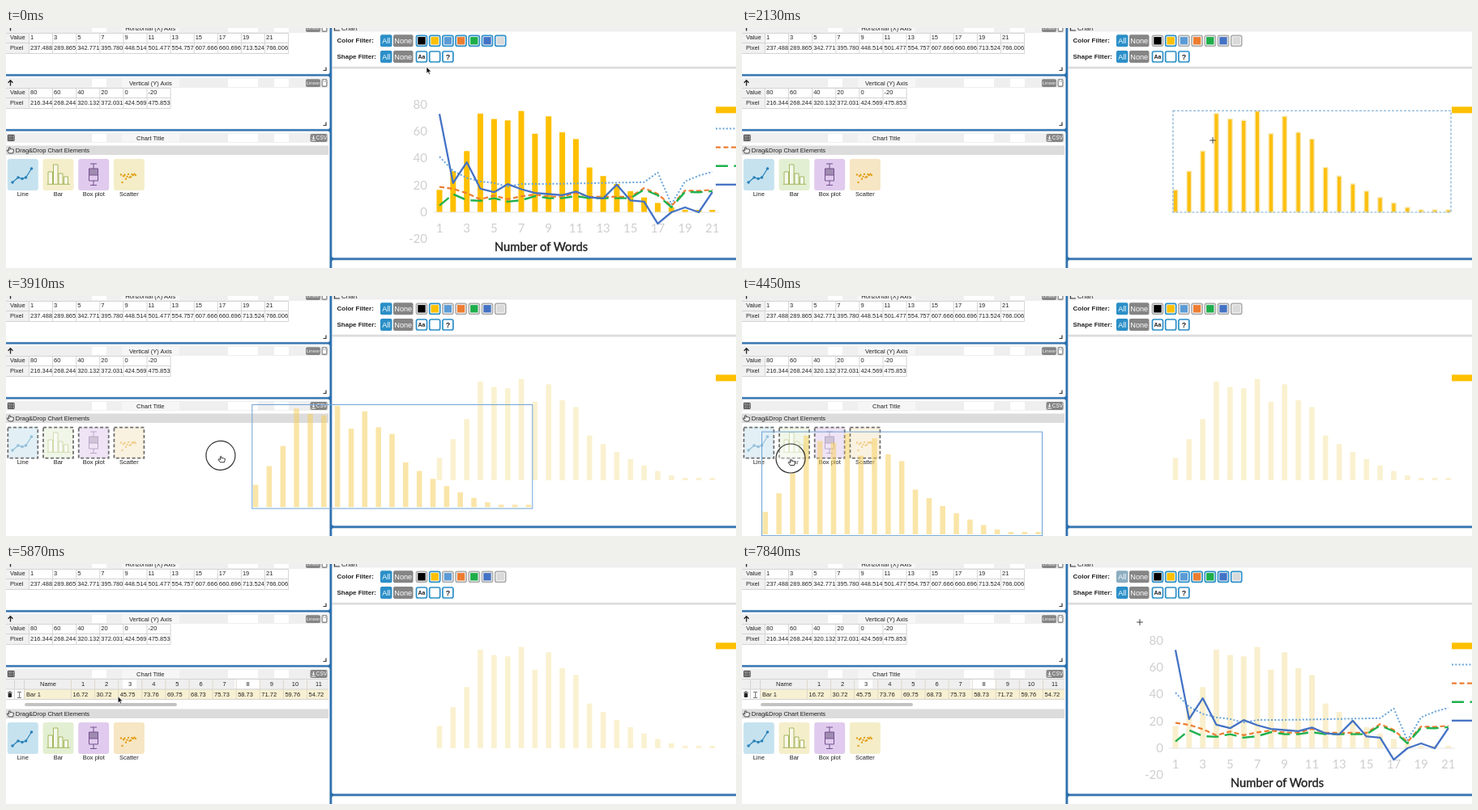
Recreate the animation shown at these times as an HTML page. Size 901x297 px, loop 8000 ms.

```html
<!DOCTYPE html>
<html lang="en">
<head>
<meta charset="utf-8">
<title>Chart extraction demo</title>
<style>
  html, body { margin: 0; width: 100%; height: 100%; overflow: hidden; background: #2a6fae; }
  svg { display: block; width: 901px; height: 297px; font-family: "Liberation Sans", Arial, sans-serif; fill: #222; }
  .m { text-anchor: middle; }
  .e { text-anchor: end; }
  .b { font-weight: 700; }
  .plot { font-family: Lato, Carlito, sans-serif; }
  .o { fill: none; }
</style>
</head>
<body>
<svg id="stage" viewBox="0 0 901 297" xmlns="http://www.w3.org/2000/svg"></svg>
<script>
const STEP = 178.1, LOOP = 8000;
const BLUE = '#2b8fc8', GRAY = '#858585', GRID = '#d4d4d4', HEAD = '#efefef';

// Markup helpers
const rect = (x, y, w, h, fill, more = '') =>
  `<rect x="${x}" y="${y}" width="${w}" height="${h}" fill="${fill}" ${more}/>`;
const text = (x, y, s, size = 7.5, more = '') =>
  `<text x="${x}" y="${y}" font-size="${size}" ${more}>${s}</text>`;
const path = (d, stroke, w = 1, more = '') =>
  `<path class="o" d="${d}" stroke="${stroke}" stroke-width="${w}" ${more}/>`;
const dot = (x, y, r, fill, more = '') => `<circle cx="${x}" cy="${y}" r="${r}" fill="${fill}" ${more}/>`;
const group = (id, body, more = '') => `<g id="${id}" ${more}>${body}</g>`;
const list = (n, fn) => Array.from({ length: n }, (_, i) => fn(i));
const each = (n, fn) => list(n, fn).join('');
const panel = (x, y, w, h) => rect(x, y, w, h, '#fff', 'rx="2" stroke="#c9d6e2" stroke-width=".6"');

const trash = (x, y, c) =>
  rect(x, y + 2, 4.4, 5, c, 'rx=".7"') + path(`M${x - .6} ${y + 1}h5.6M${x + 1.3} ${y}h1.8`, c, 1);
const handShape =
  'M-2 4L-4.2 1Q-4.6 -.6 -3 .2L-2 1V-3Q-1 -4.4 -.4 -3V-1Q.6 -2.4 1.2 -1Q2.2 -2 2.7 -.6Q4.2 -1.3 4 .6L3 4Z';
const hand = (fill, w = .9) => `<path d="${handShape}" fill="${fill}" stroke="#222" stroke-width="${w}" stroke-linejoin="round"/>`;

// Left column
const COL = 29.1;
const header = (y, title) => rect(0, y - 6, 398, 12, HEAD) + rect(106, y - 5, 18, 10, '#fff') +
  rect(143, y - 5, 71, 10, '#f6f6f6') + rect(274, y - 5, 37, 10, '#fff') + rect(331, y - 5, 18, 10, '#fff') +
  text(178.3, y + 2.5, title, 7.55, 'class="m"');

function axisPanel(y, title, value, pixels) {
  const n = pixels.length, end = 28.5 + COL * n;
  let s = panel(-3, y - 8.2, 402.3, 65.2) + header(y, title);
  s += path(`M5.5 ${y + 3.5}v-6.5M2.6 ${y - .3}l2.9 -3l2.9 3`, '#222', 1.3);
  s += rect(370, y - 4.7, 18, 9.6, GRAY, 'rx="2"') + text(379, y + 2.1, 'Linear', 6.2, 'class="m" fill="#eee"');
  s += rect(389.5, y - 4.7, 7, 9.6, GRAY, 'rx="2"') + trash(390.8, y - 3.4, '#fff');
  s += rect(0, y + 6.5, 28.5, 25, '#f1f1f1');
  s += path(`M0 ${y + 6.5}H${end}M0 ${y + 18.5}H${end}M0 ${y + 31.5}H${end}`, GRID);
  s += each(n + 1, i => path(`M${28.5 + COL * i} ${y + 6.5}v25`, GRID));
  s += text(5, y + 14.4, 'Value') + text(5, y + 27.3, 'Pixel');
  s += each(n, i => text(30 + COL * i, y + 14.4, value(i)) + text(30 + COL * i, y + 27.3, pixels[i]));
  return s + path(`M391.5 ${y + 52.5}h3.5v-4`, '#333', 1.2);
}

// The first bars are printed in the table; the rest tail off
const printed = '16.72 30.72 45.75 73.76 69.75 68.73 75.73 58.73 71.72 59.76 54.72'.split(' ');
const barValues = [...printed.map(Number), ...list(10, j => Math.max(1.8, 33.5 * Math.max(0, 1 - j / 8) ** 1.6))];

function dataTable() {
  let s = rect(0, 142, 398, 13, HEAD) + rect(23, 155, 375, 12.5, '#f8f0d2');
  s += rect(144, 143, 17, 11, '#fff') + rect(282, 143, 32, 11, '#fff');
  s += path('M0 142.5H398M0 155H398M0 167.5H398M10.5 142V167M22.5 142V167', GRID);
  s += text(52, 151.2, 'Name', 7.5, 'class="m"') + text(25, 163.8, 'Bar 1');
  s += trash(2.6, 158, '#222') + path('M14 158.5h5M16.5 158.5v7M14 165.5h5', '#777');
  s += printed.map((v, i) => path(`M${80.5 + COL * i} 142V167`, '#ddd8c8') +
    text(95 + COL * i, 151.2, i + 1, 7.5, 'class="m"') + text(82.5 + COL * i, 163.8, v)).join('');
  return s + rect(23, 172, 188, 4, '#c3c3c3', 'rx="2"');
}

let seed = 7;
const rand = () => (seed = seed * 16807 % 2147483647) / 2147483647;

const lineIcon = 'M8 191L15 185L20 186.5L24.5 185L31.5 174';
const icons = [
  path(lineIcon, '#2b83b8', 1.2) +
    lineIcon.slice(1).split('L').map(p => dot(...p.split(' '), 1.8, '#2b83b8')).join(''),
  `<path d="M52 193V178h5.5V193M58.5 193V169h5.5V193M65 193V180h5V193M71.5 193V184h5V193"
    fill="#fff" fill-opacity=".6" stroke="#a3b65c"/>` + path('M50.5 193.3H79', '#a3b65c'),
  path('M108 168V174M108 189V194.5M104 168h8M104 194.5h8', '#75508f') +
    rect(102.5, 174, 11, 8, '#a08bb0') + path('M102.5 174h11v15h-11zM102.5 182h11', '#75508f'),
  each(13, i => dot(142 + i * 1.5, 187 - i * .7 + (rand() - .5) * 11, 1.2, '#e2a01c'))
];
const tileX = i => 2 + 43.7 * i;
const tiles = ['Line', 'Bar', 'Box plot', 'Scatter'].map((name, i) =>
  `<g class="tile">${rect(tileX(i) - .2, 162, 38, 39, '#fff', `rx="3" id="tile${i}"`)}${icons[i]}</g>` +
  rect(tileX(i) + .3, 162.7, 37, 38, 'none', `class="drop" id="drop${i}" stroke-width="1.8" stroke-dasharray="4 2.6"`) +
  text(tileX(i) + 18.8, 207.8, name, 7.5, 'class="m"')).join('');

const elements = rect(0, 145.5, 398, 11.5, '#dcdcdc') + text(11.8, 153.8, 'Drag&amp;Drop Chart Elements') +
  `<g transform="translate(5.6 151)">${hand('#eee', .8)}</g>` + tiles;

const resultPanel = panel(-3, 127.8, 402.3, 180) + header(136, 'Chart Title') +
  path('M2.5 132.5h7.5v7h-7.5zM2.5 135h7.5M2.5 137.3h7.5M5 132.5v7M7.5 132.5v7', '#333') +
  rect(375.5, 131, 21, 10, GRAY, 'rx="2"') + text(382.7, 138.4, 'CSV', 6.5, 'fill="#fff"') +
  path('M379.5 133v4M377.8 135.6l1.7 1.8l1.7 -1.8M377 139h5', '#fff');

// Right column
const swatches = ['#000', '#ffc000', '#5b9bd5', '#ed7d31', '#1fae4b', '#4472c4', '#d9d9d9'];
const box = (i, y, more) => rect(506.5 + 16.2 * i, y + 1, 13, 13, '#fff', `rx="2" stroke-width="1.7" ${more}`);
const button = (x, y, w, s, fill, id = '') => rect(x, y, w, 15, fill, `rx="2" ${id}`) +
  text(x + w / 2, y + 10.8, s, 9.2, 'class="m" fill="#fff"');
const filterRow = (y, name, id = '') => text(408.5, y + 9.8, name + ' Filter:', 8, 'class="b"') +
  button(462, y, 14.5, 'All', BLUE, id) + button(478, y, 24.5, 'None', GRAY);

const filters = panel(402.4, -5, 505, 289.2) + rect(403, 0, 498, 4.5, HEAD) +
  rect(403, 47.7, 498, 2.8, '#dcdcdc') + panel(402.4, 287.3, 505, 20) +
  path('M405.5 -2V3H412', '#333', 1.2) + text(414, 2.5, 'Chart', 8) +
  filterRow(8.3, 'Color', 'id="allColors"') + filterRow(28, 'Shape') +
  swatches.map((c, i) => box(i, 8.3, 'class="swatch"') + rect(508.3 + 16.2 * i, 11.1, 9.4, 9.4, c)).join('') +
  each(3, i => box(i, 28, `stroke="${BLUE}"`)) +
  text(513, 38.3, 'Aa', 7, 'class="m b"') + text(545.4, 39, '?', 9, 'class="m b"');

// Chart
const ZERO = 228, UNIT = 1.655;
const px = i => 535 + 16.84 * i, py = v => (ZERO - v * UNIT).toFixed(1);
const bars = (w, more) => `<g ${more}>` + barValues.map((v, i) =>
  `<rect x="${(px(i) - w / 2).toFixed(1)}" y="${py(v)}" width="${w}" height="${(v * UNIT).toFixed(1)}"/>`).join('') + '</g>';

// Each curve is a smooth trend with bumps at single points
const curve = (row, stroke, w, dash, trend, bumps) => {
  const more = `stroke-linejoin="round" stroke-dasharray="${dash}"`;
  return path('M' + list(21, i => `${px(i).toFixed(1)} ${py(trend(i) + (bumps[i] || 0))}`).join('L'), stroke, w, more) +
    path(`M876 ${101.4 + 23.1 * row}H905`, stroke, w, more);
};
const ending = { 15: 6.5, 16: 2.2, 17: -6.8, 18: 4.7, 19: 4.5, 20: 5.3 };

const curves =
  curve(1, '#6aa5da', 2, '2 2.3', i => 19.5 + .2 * i + 22 * Math.exp(-i / 1.5), { 5: -2, 16: 7, 17: -17, 19: 4, 20: 6.7 }) +
  curve(2, '#ed7d31', 2.2, '6 3.5', i => 11.5 + 7.5 * Math.exp(-i / 2), { 1: 1.5, 3: -3.5, 5: -2.4, 7: 1.5, 10: 3, ...ending }) +
  curve(3, '#1fb14c', 2.4, '15 7.5', () => 10.5, { 0: -5.5, 1: 3, 2: -1.5, 3: -2, 5: -2.6, 6: -1.5, 7: 1.5, 10: 1.5, ...ending }) +
  curve(4, '#4472c4', 2.3, 'none', i => 20 - .8 * i,
    { 0: 53.5, 1: 2.6, 2: 19, 4: -1.8, 5: 5, 6: 2, 10: 3.5, 13: 11, 16: -15.7, 17: -6.4, 18: -2, 19: -4.8, 20: 11 });

const labels =
  each(6, i => text(520, 100.2 + 33.1 * i, 80 - 20 * i, 15, 'class="e" fill="#cfcfcf"')) +
  each(11, i => text(px(2 * i), 253.4, 2 * i + 1, 15, 'class="m" fill="#cfcfcf"')) +
  path(`M527 ${ZERO}H880`, '#e4e4e4') +
  text(660.5, 276, 'Number of Words', 14.7, 'class="m" stroke="#222" stroke-width=".4"');

const chart = group('legend', rect(876, 97.4, 30, 8, '#ffc000')) +
  group('fullBars', bars(7, 'id="fullFill"')) + group('full', labels + curves, 'class="plot"') +
  group('soloBars', bars(5.6, 'fill="#fdbf10" stroke-width="1.4" stroke="#f8ebb8" stroke-linejoin="round"')) +
  group('paleBars', bars(6.6, 'fill="#faf1d0"')) +
  rect(532, 102.5, 343, 125.5, 'none', 'id="hover" stroke="#79acd6" stroke-width="1.2" stroke-dasharray="3 2"') +
  rect(530.7, 101.2, 346, 128.5, 'none', 'id="picked" stroke="#86aee6" stroke-width="1.1"');

const ghost = group('ghost',
  `<g transform="translate(-530.7 -101.2)">${bars(6.6, 'fill="#f7cf5a" opacity=".52"')}</g>` +
  rect(0, 0, 346, 128.5, 'none', 'stroke="#6fa3d4" stroke-width="1"'));

const cursor = group('cursor',
  dot(0, 0, 18, '#fff', 'id="ring" fill-opacity=".35" stroke="#333" stroke-width="1.2"') +
  group('arrow', '<path d="M0 0V8.2L1.9 6.5L3.2 9.4L4.5 8.8L3.2 6H5.8Z" fill="#111" stroke="#fff" stroke-width=".6"/>') +
  group('cross', path('M-3.8 0H3.8M0 -3.8V3.8', '#444')) +
  group('grab', hand('#fff')) +
  group('plus', dot(5, 11.5, 5.5, '#2f9e3f') + path('M2 11.5h6M5 8.5v6', '#fff', 1.6)));

const stage = document.getElementById('stage');
stage.innerHTML = rect(0, 0, 901, 297, '#2a6fae') +
  axisPanel(0, 'Horizontal (X) Axis', i => 2 * i + 1,
    '237.488 289.865 342.771 395.780 448.514 501.477 554.757 607.666 660.696 713.524 766.006'.split(' ')) +
  axisPanel(68, 'Vertical (Y) Axis', i => 80 - 20 * i, '216.344 268.244 320.132 372.031 424.569 475.853'.split(' ')) +
  resultPanel + group('table', dataTable()) + group('elements', elements) + filters + chart + ghost + cursor;

// Pointer path as [step, x, y]
const pointer = [[0, 519, 48], [3, 490, 17], [4, 490, 17], [6, 529, 17], [7, 529, 17], [12, 581, 139], [15, 587, 150],
  [19, 587, 150], [24, 90, 223], [25, 60, 201], [30, 58, 191], [31, 58, 191], [38, 462.5, 53.5], [40, 468, 17], [44, 491, 72]];

function pointerAt(k) {
  const i = Math.max(1, pointer.findIndex(p => p[0] >= k));
  const [a, ax, ay] = pointer[i - 1], [b, bx, by] = pointer[i];
  const u = Math.max(0, (k - a) / (b - a)), e = u * u * (3 - 2 * u);
  return [ax + (bx - ax) * e, ay + (by - ay) * e];
}

const el = id => document.getElementById(id);
const show = (id, on) => { el(id).style.display = on ? '' : 'none'; };
const set = (id, name, v) => el(id).setAttribute(name, v);
const move = (id, x, y) => set(id, 'transform', `translate(${x.toFixed(1)} ${y.toFixed(1)})`);
const swatchBoxes = [...document.querySelectorAll('.swatch')];
const tileGroups = [...document.querySelectorAll('.tile')];

function draw(k) {
  const all = k < 4 || k >= 41, empty = k >= 4 && k < 7, solo = !all && !empty;
  const dragging = k >= 20 && k < 31, done = k >= 31, over = k >= 27 && dragging;

  show('full', all);
  show('fullBars', all);
  set('fullFill', 'fill', done ? '#f9efcd' : '#ffc000');
  show('legend', !empty);
  show('soloBars', solo && k < 20);
  show('paleBars', solo && k >= 20);
  show('hover', k >= 11 && k < 20);
  show('picked', k >= 17 && k < 20);
  swatchBoxes.forEach((s, i) => s.setAttribute('stroke', all || (solo && i === 1) ? BLUE : '#acacac'));
  set('allColors', 'fill', k >= 41 ? '#8cadc0' : BLUE);

  show('table', done);
  move('elements', 0, done ? 34 : 0);
  ['#c6e2ef', all ? '#f5eecb' : '#e3efd2', '#e0cbee', all ? '#f4edc8' : '#f7e6c4'].forEach((c, i) => {
    const target = over && i === 1;
    set('tile' + i, 'fill', target ? '#c6e2ef' : c);
    tileGroups[i].setAttribute('opacity', dragging ? .5 : 1);
    show('drop' + i, dragging);
    set('drop' + i, 'stroke', target ? '#3f8fc6' : '#707070');
  });

  // The dragged copy trails the pointer slightly
  const [gx, gy] = pointerAt(k - .65);
  show('ghost', dragging);
  move('ghost', gx - 57, gy - 48.7);
  move('cursor', ...pointerAt(k));
  show('ring', dragging);
  set('ring', 'r', over ? 22 : 18);
  const grab = k >= 15 && k < 27, cross = (k >= 9 && k < 15) || k >= 43;
  show('grab', grab);
  show('cross', cross);
  show('arrow', !grab && !cross);
  show('plus', over);
  set('grab', 'transform', dragging ? 'translate(1.5 4.5)' : '');
}

let last = -1;
function tick() {
  const k = Math.min(44, Math.floor((performance.now() % LOOP + 8) / STEP));
  if (k !== last) draw(last = k);
  requestAnimationFrame(tick);
}
tick();
</script>
</body>
</html>
```
